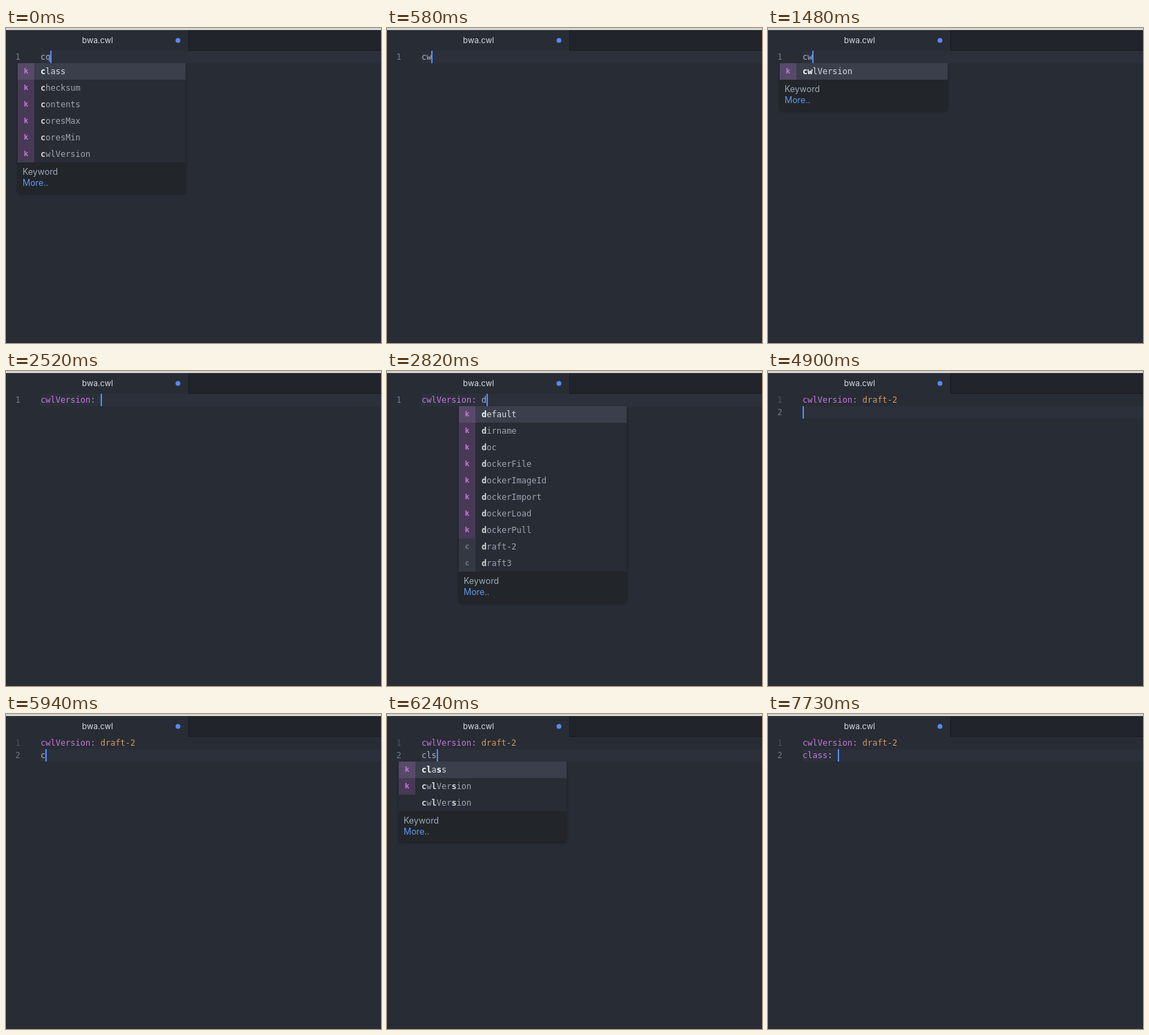
An HTML page for the animation above (8 s loop, 543x457 px).

```html
<!DOCTYPE html>
<html lang="en">
<head>
<meta charset="utf-8">
<title>Editor autocomplete</title>
<style>
html, body { margin: 0; width: 100%; height: 100%; overflow: hidden; background: #282c34; }
svg { display: block; width: 543px; height: 457px; }
text { white-space: pre; font: 12px "DejaVu Sans Mono", monospace; }
.ui { font: 12.4px Inter, sans-serif; }
.title { font: 11.6px Inter, sans-serif; }
.b { font-weight: 700; }
</style>
</head>
<body>
<svg viewBox="0 0 543 457">
  <defs>
    <filter id="shadow" x="-10%" y="-10%" width="120%" height="125%">
      <feDropShadow dx="0" dy="2" stdDeviation="2" flood-color="#000" flood-opacity=".3"/>
    </filter>
  </defs>
  <rect width="543" height="457" fill="#282c34"/>
  <rect x="264" y="3" width="279" height="30" fill="#21252b"/>
  <path d="M264.5 3V32.5H543" fill="none" stroke="#181a1f"/>
  <rect width="543" height="3" fill="#d3d6d2"/>
  <text class="title" x="132.5" y="22" text-anchor="middle" fill="#d7dae0">bwa.cwl</text>
  <circle cx="249" cy="18" r="3.5" fill="#568af2"/>
  <rect y="454" width="543" height="3" fill="#2a2d38"/>
  <g id="view"></g>
</svg>
<script>
const LOOP = 8000, LEFT = 50, TOP = 33, LINE = 18, CHAR = 7.224, ROW = 24, WIDTH = 243;
const GREY = '#abb2bf', PURPLE = '#c678dd', ORANGE = '#d19a66', BLUE = '#528bff';
const view = document.getElementById('view');

// Suggestions: icon letter, then the word.
const items = (icon, words) => words.split(' ').filter(Boolean).map(word => ({ icon, word }));
const lists = {
  c: items('k', 'class checksum contents coresMax coresMin cwlVersion'),
  cw: items('k', 'cwlVersion'),
  cls: [...items('k', 'class cwlVersion'), ...items('', 'cwlVersion')],
  d: [...items('k', 'default dirname doc dockerFile dockerImageId dockerImport dockerLoad dockerPull'),
      ...items('c', 'draft-2 draft3')],
  dra: items('c', 'draft-2 draft3 draft-3.dev1 draft3-dev2 draft3-dev3 draft3-dev4 draft3-dev5 draft4.dev1 draft4.dev2 draft4.dev3')
};

// Start time, text, caret shown, prefix of the open list, lines in the gutter.
const V = 'cwlVersion', D = V + ': draft-2', N = D + '\n';
const steps = [
  [0, 'cq', 1, 'c'], [140, 'cq', 1], [290, 'c', 1], [580, 'cw', 1], [730, 'cw', 1, 'cw'],
  [1030, 'cw', 0, 'cw'], [1480, 'cw', 1, 'cw'], [1620, V, 1], [1920, V, 0],
  [2370, V + ':', 1], [2520, V + ': ', 1], [2820, V + ': d', 1, 'd'],
  [3120, V + ': dra', 1, 'd'], [3270, V + ': dra', 1, 'dra'], [3420, V + ': dra', 0, 'dra'],
  [3710, D, 1], [4010, N, 1, '', 1], [4160, N, 1], [4460, N, 0], [4900, N, 1], [5200, N, 0], [5640, N, 1],
  [5940, N + 'c', 1], [6090, N + 'cls', 1, 'c'], [6240, N + 'cls', 1, 'cls'],
  [6530, N + 'cls', 0, 'cls'], [6830, N + 'cls', 1, 'cls'],
  [7130, N + 'class', 1], [7430, N + 'class', 0], [7580, N + 'class:', 1], [7730, N + 'class: ', 1]
];

const rect = (x, y, w, h, fill, extra = '') =>
  `<rect x="${x}" y="${y}" width="${w}" height="${h}" fill="${fill}" ${extra}/>`;
const text = (x, y, body, fill, extra = '') =>
  `<text x="${x}" y="${y}" fill="${fill}" ${extra}>${body}</text>`;
const span = (body, fill, cls = '') => `<tspan fill="${fill}" class="${cls}">${body}</tspan>`;

function highlight(line) {
  return line
    .replace(/draft-2$/, s => span(s, ORANGE))
    .replace(/^cwlVersion:/, s => span(s, PURPLE))
    .replace(/^class(?=:)/, s => span(s, PURPLE));
}

// Letters of the prefix are matched in order and set in bold.
function mark(word, prefix, selected) {
  let i = 0;
  return [...word].map(ch => {
    const hit = ch === prefix[i];
    if (hit) i++;
    return hit ? span(ch, selected ? '#fff' : '#d7dae0', 'b') : ch;
  }).join('');
}

function popup(x, y, prefix) {
  const list = lists[prefix], foot = y + list.length * ROW;
  let out = rect(x, y, WIDTH, foot - y + 44, '#21252b', 'filter="url(#shadow)"')
    + rect(x, y, WIDTH, foot - y, '#282c34');
  list.forEach(({ icon, word }, i) => {
    const top = y + i * ROW, selected = i === 0, key = icon === 'k';
    if (selected) out += rect(x, top, WIDTH, ROW, '#3a3f4b');
    if (icon) {
      const fill = key ? (selected ? '#564a68' : '#483956') : (selected ? '#444955' : '#333842');
      out += rect(x, top, ROW, ROW, fill)
        + text(x + 12, top + 15, icon, key ? PURPLE : '#737985', 'text-anchor="middle" class="b" style="font-size:11px"');
    }
    out += text(x + 33, top + 16, mark(word, prefix, selected), selected ? '#d7dae0' : '#9da5b4');
  });
  return out
    + text(x + 7, foot + 18, list[0].icon === 'k' ? 'Keyword' : 'CWLVersion', '#9da5b4', 'class="ui"')
    + text(x + 7, foot + 34, 'More..', '#6494ed', 'class="ui"');
}

function draw([, source, caret, prefix, gutter]) {
  const lines = source.split('\n'), row = lines.length - 1, line = lines[row];
  const numbers = gutter || lines.length, top = TOP + row * LINE;
  let out = rect(LEFT, top, 543 - LEFT, LINE, '#2c303b');
  lines.forEach((s, i) => {
    const base = TOP + i * LINE + 13;
    if (i < numbers) out += text(13.4, base, i + 1, i === numbers - 1 ? '#737b8a' : '#495162');
    out += text(LEFT, base, highlight(s), GREY);
  });
  if (caret) out += rect(Math.round(LEFT + line.length * CHAR), top, 2, LINE, BLUE);
  if (prefix) {
    const start = line.lastIndexOf(' ') + 1;
    out += popup(Math.round(LEFT + start * CHAR) - 33, top + LINE, prefix);
  }
  view.innerHTML = out;
}

let shown;
function tick() {
  const t = performance.now() % LOOP;
  const step = steps.findLast(s => s[0] <= t);
  if (step !== shown) draw(shown = step);
  requestAnimationFrame(tick);
}
tick();
</script>
</body>
</html>
```
